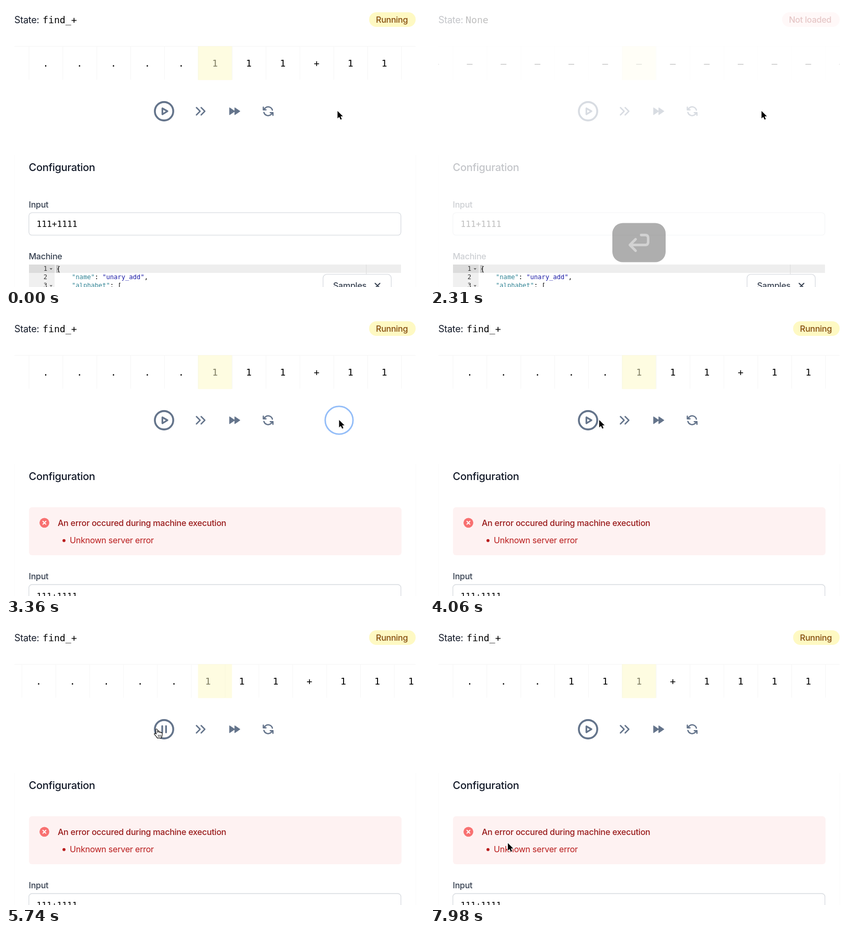
Animation of 800 by 538 pixels, one loop 8000 ms. Source, as an HTML page with a canvas:

```html
<!DOCTYPE html>
<html lang="en">
<head>
<meta charset="utf-8">
<title>Tape machine</title>
<style>
  html, body { margin: 0; width: 100%; height: 100%; overflow: hidden; background: #fff; }
  canvas { display: block; width: 100vw; height: 100vh; }
</style>
</head>
<body>
<canvas id="stage" width="800" height="538"></canvas>
<script>
const ctx = document.getElementById('stage').getContext('2d');
const LOOP = 8000, CELL = 64.8, HEAD_X = 400;
const SANS = 'Inter, "Liberation Sans", sans-serif';
const MONO = '"DejaVu Sans Mono", "Liberation Mono", monospace';
const INK = '#111827', SLATE = '#64748b', LINE = '#d1d5db';

// Moments in ms
const T = {
  unload: 560, key: 980, dim: 1120, reset: 1750, wake: 2240, load: 2520,
  click: 3140, glide: 3500, play: 4358, steps: [5660, 6660], pause: 7250, leave: 7450
};
const BUTTON = [288, 201];

const clamp = v => Math.max(0, Math.min(1, v));
const span = (t, start, length) => clamp((t - start) / length);
const smooth = p => p * p * (3 - 2 * p);
const mix = (a, b, p) => a + (b - a) * p;
const within = (t, a, b) => t >= a && t < b;

// CSS "ease": cubic-bezier(.25, .1, .25, 1)
function ease(x) {
  const curve = (a, b, u) => 3 * a * u * (1 - u) ** 2 + 3 * b * u * u * (1 - u) + u ** 3;
  let lo = 0, hi = 1;
  for (let i = 0; i < 20; i++) {
    const mid = (lo + hi) / 2;
    if (curve(.25, .25, mid) < x) lo = mid; else hi = mid;
  }
  return curve(.1, 1, lo);
}

function sans(str, x, y, size, color, weight = 500) {
  ctx.font = `${weight} ${size}px ${SANS}`;
  ctx.letterSpacing = `${-size * 0.0145}px`;
  ctx.textAlign = 'left';
  ctx.fillStyle = color;
  ctx.fillText(str, x, y);
}

function mono(str, x, y, size, color, align = 'left') {
  ctx.font = `${size}px ${MONO}`;
  ctx.letterSpacing = '0px';
  ctx.textAlign = align;
  ctx.fillStyle = color;
  ctx.fillText(str, x, y);
}

function rect(x, y, w, h, color) {
  ctx.fillStyle = color;
  ctx.fillRect(x, y, w, h);
}

function box(x, y, w, h, r, fill, border) {
  ctx.beginPath();
  ctx.roundRect(x, y, w, h, r);
  ctx.fillStyle = fill;
  ctx.fill();
  if (border) stroke(border, 1.1);
}

function stroke(color, width) {
  ctx.strokeStyle = color;
  ctx.lineWidth = width;
  ctx.stroke();
}

function disc(x, y, r, color) {
  ctx.beginPath();
  ctx.arc(x, y, r, 0, Math.PI * 2);
  ctx.fillStyle = color;
  ctx.fill();
}

function strokePath(d, color, width) {
  ctx.strokeStyle = color;
  ctx.lineWidth = width;
  ctx.stroke(new Path2D(d));
}

function drawHeader(loaded) {
  sans('State:', 16, 32.5, 18, INK, 400);
  mono(loaded ? 'find_+' : 'None', loaded ? 70 : 68, 32.5, 18.2, '#000');
  if (loaded) {
    box(695, 12, 89, 28, 14, '#fef9c3');
    sans('Running', 708, 32, 16, '#854d0e');
  } else {
    box(674, 12, 110, 28, 14, '#fee2e2');
    sans('Not loaded', 687, 32, 16, '#991b1b');
  }
}

function drawTape(head, blank) {
  const tape = '111+1111';
  ctx.save();
  ctx.beginPath();
  ctx.rect(16, 76, 768, 67);
  ctx.clip();
  rect(16, 76.8, 768, 1, '#f6f6f6');
  for (let i = Math.floor(head) - 7; i < head + 8; i++) {
    const x = HEAD_X + (i - head) * CELL;
    rect(x + CELL / 2, 77, 1, 64, '#f6f6f6');
    mono(blank ? '–' : tape[i] || '.', x, 116, 18.2, '#000', 'center');
  }
  rect(367.5, 77, 65, 64.8, 'rgba(254,249,195,.5)');
  ctx.restore();
}

function drawControls(playing) {
  ctx.beginPath();
  ctx.arc(302.5, 201.5, 17.6, 0, Math.PI * 2);
  stroke(SLATE, 3.6);
  if (playing) {
    strokePath('M299 195.5V207.5M306.3 195.5V207.5', SLATE, 3.3);
  } else {
    strokePath('M299.3 195.8L309 201.5L299.3 207.3Z', SLATE, 3.2);
  }
  strokePath('M364.5 194.5L371.5 201.5L364.5 208.5M373.5 194.5L380.5 201.5L373.5 208.5', SLATE, 2.5);
  const triangles = new Path2D('M428 195L437.5 201.5L428 208ZM438 195L447.5 201.5L438 208Z');
  ctx.fillStyle = SLATE;
  ctx.fill(triangles);
  strokePath('M428 195L437.5 201.5L428 208ZM438 195L447.5 201.5L438 208Z', SLATE, 1.4);
  ctx.save();
  ctx.translate(501.7, 201.5);
  ctx.scale(-1.02, 1.02);
  ctx.translate(-12, -12);
  strokePath('M16.02 9.35h4.99M2.98 19.64v-4.99h4.99M2.98 14.65l3.18 3.18a8.25 8.25 0 0 0 13.8-3.7' +
    'M4.03 9.87a8.25 8.25 0 0 1 13.8-3.7l3.18 3.18v-4.99', SLATE, 2.4);
  ctx.restore();
}

function drawError() {
  box(44, 368, 713, 92, 6, '#fef2f2');
  disc(73.5, 397.8, 9.4, '#f87171');
  strokePath('M70.7 395l5.6 5.6M76.3 395l-5.6 5.6', '#fff', 1.9);
  sans('An error occured during machine execution', 99, 404, 16, '#991b1b');
  disc(111, 431.8, 2.9, '#b91c1c');
  sans('Unknown server error', 122, 436.7, 16, '#b91c1c', 400);
}

function drawForm(offset) {
  sans('Input', 43.5, 386 + offset, 16, '#374151');
  box(43.8, 395.8, 712, 43, 6, '#fff', LINE);
  if (offset) {
    rect(40, 460.5, 720, 20, '#fff');
  }
}

function drawConfiguration(failed) {
  rect(15.5, 285, 1, 253, '#fbfbfb');
  rect(784, 285, 1, 253, '#fbfbfb');
  sans('Configuration', 43.5, 316, 20, INK);
  if (failed) drawError();
  const shift = failed ? 120.3 : 0;
  sans('Input', 43.5, 385.7 + shift, 16, '#374151');
  box(43.8, 395.8 + shift, 712, 43, 6, '#fff', LINE);
  mono('111+1111', 58.5, 423.3 + shift, 16.2, '#000');
  if (!failed) sans('Machine', 43.5, 485, 16, '#374151');
}

function drawEditor() {
  const size = 12.13, row = y => y * 16.2 + 507;
  rect(44, 495, 712, 43, '#fff');
  rect(44, 495, 49, 43, '#f0f0f0');
  rect(44, 495, 49, 16, '#dcdcdc');
  rect(93, 495, 663, 16, '#eeeeee');
  rect(689, 495, 1, 43, '#dedede');
  for (let i = 0; i < 3; i++) {
    mono(String(i + 1), 79, row(i), size, '#333', 'right');
    if (i !== 1) {
      ctx.fillStyle = '#666';
      ctx.fill(new Path2D(`M83.5 ${row(i) - 5}h5.4l-2.7 3.2z`));
    }
  }
  rect(96, 496, 5, 15, '#c4c4c4');
  mono('{', 97, row(0), size, '#000');
  const pair = (line, key, rest, color, tail) => {
    const unit = size * 0.602, x = 126;
    mono(key, x, row(line), size, '#318495');
    mono(':', x + key.length * unit, row(line), size, '#000');
    const at = x + (key.length + 2) * unit;
    mono(rest, at, row(line), size, color);
    mono(tail, at + rest.length * unit, row(line), size, '#000');
  };
  pair(1, '"name"', '"unary_add"', '#1a1aa6', ',');
  pair(2, '"alphabet"', '[', '#000', '');
  box(606.8, 513.8, 130.5, 42, 7, '#fff', LINE);
  sans('Samples', 626, 541, 16, '#374151');
  strokePath('M706.5 531l9 9M715.5 531l-9 9', '#374151', 2);
}

function drawKey(alpha) {
  ctx.save();
  ctx.globalAlpha = alpha;
  box(349, 415.5, 102, 75, 20, '#4a4a4a');
  strokePath('M404 438.5H412Q417.5 438.5 417.5 444V452Q417.5 457.5 412 457.5H383' +
    'M393.5 446.5L382.5 457.5L393.5 468.5', '#fff', 4.8);
  ctx.restore();
}

function drawRing(t, start, x, y) {
  const p = (t - start) / 400;
  if (p < 0 || p >= 1) return;
  ctx.save();
  ctx.globalAlpha = clamp((1 - p) * 7);
  ctx.beginPath();
  ctx.arc(x, y, 20 + 12 * p, 0, Math.PI * 2);
  stroke('#93bdf8', 4.6 - 3.2 * p);
  ctx.restore();
}

function pointerAt(t) {
  const nudge = smooth(span(t, 2800, 300));
  const glide = smooth(span(t, T.glide, 700));
  const leave = smooth(span(t, T.leave, 500));
  const x = mix(mix(634.5, 637.5, nudge), BUTTON[0], glide);
  return [mix(x, 149, leave), mix(BUTTON[1], 419.5, leave)];
}

function drawPointer([x, y]) {
  const hand = Math.hypot(x - 302.5, y - 201.5) < 20;
  const shape = new Path2D(hand
    ? 'M-1.5 1.5C-1.5-.5 1.5-.5 1.7 1.5L2.6 7C3-.0 5.6 4.8 5.8 7C6.6 5 8.6 5.6 8.8 7.6C10 6.4 11.4 7.2 11.3 9' +
      'L10.6 13.5L9.3 17.3H1.5L-.8 13.8L-4 10.2C-4.8 8.2-2.4 7.6-.4 9.7Z'
    : 'M0 0V14.2L3.3 11.2L5.8 16.6L8.2 15.5L5.8 10.3H10.3Z');
  ctx.save();
  ctx.translate(x, y);
  ctx.fillStyle = hand ? '#fff' : '#000';
  if (hand) {
    ctx.fill(shape);
    ctx.strokeStyle = '#111';
    ctx.lineWidth = 1.2;
    ctx.stroke(shape);
    strokePath('M3.4 11.5V15M5.8 11.5V15M8.2 11.5V15', '#111', 0.9);
  } else {
    ctx.strokeStyle = '#fff';
    ctx.lineWidth = 2;
    ctx.stroke(shape);
    ctx.fill(shape);
  }
  ctx.restore();
}

function draw(t) {
  const failed = t >= T.load;
  const head = T.steps.reduce((sum, start) => sum + ease(span(t, start, 500)), 0);
  const dim = 0.75 * (smooth(span(t, T.dim, 560)) - smooth(span(t, T.load, 300)));

  ctx.lineCap = ctx.lineJoin = 'round';
  rect(0, 0, 800, 538, '#fff');
  drawHeader(!within(t, T.unload, T.load));
  drawTape(head, within(t, T.reset, T.load));
  drawControls(within(t, T.play, T.pause));
  drawConfiguration(failed);
  if (dim > 0) rect(0, 0, 800, 538, `rgba(255,255,255,${dim})`);
  if (!failed) drawEditor();

  if (within(t, T.key, 2400)) drawKey(1 - span(t, 2200, 200));
  drawRing(t, T.click, 637.5, 201.5);
  drawRing(t, T.play, ...BUTTON);
  drawRing(t, T.pause, ...BUTTON);
  if (!within(t, T.key, T.wake)) drawPointer(pointerAt(t));
}

const began = performance.now();
function tick() {
  draw((performance.now() - began) % LOOP);
  requestAnimationFrame(tick);
}
tick();
</script>
</body>
</html>
```
